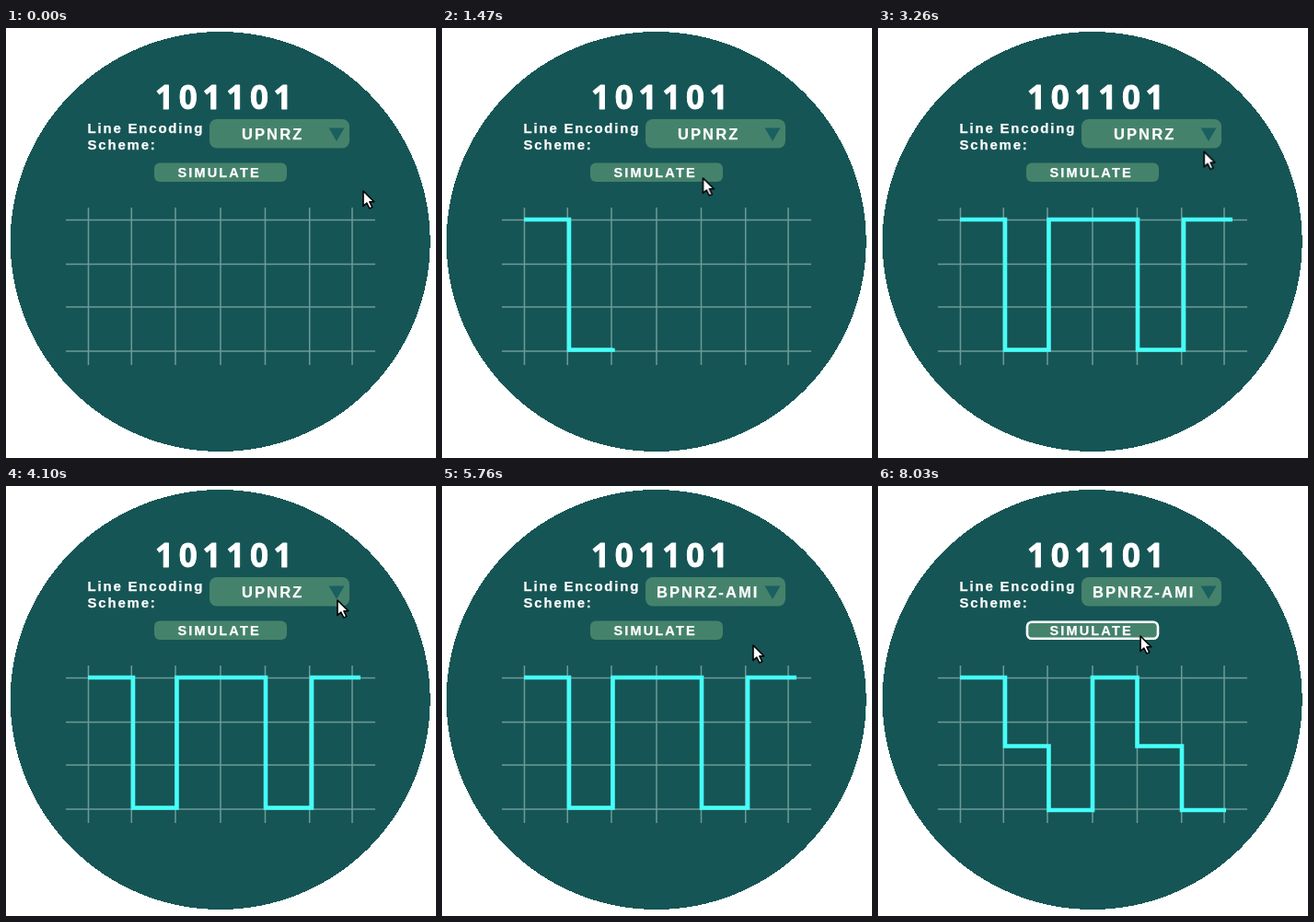
Animation of 467x467 px, one loop 8.37 s. Source, as an HTML page:

```html
<!DOCTYPE html>
<html lang="en">
<head>
<meta charset="utf-8">
<title>Line encoding simulator</title>
<style>
  html, body { margin: 0; width: 100%; height: 100%; overflow: hidden; background: #fff; }
  svg { display: block; width: 100%; height: 100%; }

  text { font: bold 15px "Liberation Sans", Arial, sans-serif; letter-spacing: 1.8px; fill: #fff; stroke: #fff; stroke-width: .25; stroke-linejoin: round; }
  .bits { font: bold 35px "Noto Sans", "Open Sans", sans-serif; letter-spacing: 5.7px; stroke-width: .9; }
  .scheme { font-size: 16.5px; letter-spacing: 2.1px; }
  .action { font-size: 14.5px; letter-spacing: 2.15px; }

  .control { fill: #45826c; }
  .grid { fill: none; stroke: #6e9b99; stroke-width: 1.5; }
  .wave { fill: none; stroke: #45fff8; stroke-width: 4.6; stroke-dasharray: 1 2; }
  .focus { fill: none; stroke: #fff; stroke-width: 2.6; }
  .pointer { fill: #fff; stroke: #000; stroke-width: 1.6; stroke-linejoin: round; }

  .timed { animation: 8370ms infinite; }
  .wave.unipolar { animation-name: drawFirst, showFirst; animation-timing-function: linear, step-end; }
  .wave.bipolar { animation-name: drawSecond, showSecond; animation-timing-function: linear, step-end; }
  .focus { animation-name: showSecond; animation-timing-function: step-end; }
  .before { animation-name: before; animation-timing-function: step-end; }
  .after { animation-name: after; animation-timing-function: step-end; }
  .pointer { animation-name: point; animation-timing-function: linear; }

  @keyframes drawFirst { 0%, 13.3% { stroke-dashoffset: 1; } 28.67%, 100% { stroke-dashoffset: 0; } }
  @keyframes drawSecond { 0%, 80.56% { stroke-dashoffset: 1; } 95.94%, 100% { stroke-dashoffset: 0; } }
  @keyframes showFirst { 0% { opacity: 0; } 14.33% { opacity: 1; } 81.6%, 100% { opacity: 0; } }
  @keyframes showSecond { 0% { opacity: 0; } 81.6%, 100% { opacity: 1; } }
  @keyframes before { 0% { opacity: 1; } 62.1%, 100% { opacity: 0; } }
  @keyframes after { 0% { opacity: 0; } 62.1%, 100% { opacity: 1; } }
  @keyframes point {
    0%, 1.55% { transform: translate(388px, 177px); animation-timing-function: ease-in-out; }
    11.11%, 27.1% { transform: translate(283.5px, 163px); animation-timing-function: ease-in; }
    30.23% { transform: translate(302px, 167px); }
    36% { transform: translate(342px, 156px); animation-timing-function: ease-out; }
    42%, 53% { transform: translate(360px, 124px); animation-timing-function: ease-in-out; }
    61%, 64% { transform: translate(351px, 167px); animation-timing-function: ease-in; }
    68.82% { transform: translate(338px, 173px); animation-timing-function: ease-out; }
    78.38%, 100% { transform: translate(285px, 163px); }
  }
</style>
</head>
<body>
<svg viewBox="0 0 467 467">
  <circle cx="232.7" cy="232" r="228" fill="#165555" shape-rendering="crispEdges"/>

  <text class="bits" x="162" y="88.3">101101</text>
  <text x="88.5" y="114">Line Encoding</text>
  <text x="88.5" y="132.3">Scheme:</text>

  <rect class="control" x="221" y="99" width="152" height="31.5" rx="8"/>
  <path d="M350.5 108.5H367.5L359 123Z" fill="#1b6060"/>
  <text class="scheme timed before" x="256" y="121">UPNRZ</text>
  <text class="scheme timed after" x="233" y="121">BPNRZ-AMI</text>

  <rect class="control" x="161" y="146.5" width="144" height="20.5" rx="6"/>
  <rect class="focus timed" x="162" y="147.7" width="142" height="18" rx="5"/>
  <text class="action" x="186.5" y="162.3">SIMULATE</text>

  <path class="grid" d="M65 208.5H401M65 256.5H401M65 303H401M65 351H401
    M89.5 195V366M136.3 195V366M184 195V366M233 195V366M281.5 195V366M329.7 195V366M376 195V366"/>

  <path class="wave unipolar timed" pathLength="1" d="M89 208H138V349.5H185.5V208H282V349.5H332V208H385"/>
  <path class="wave bipolar timed" pathLength="1" d="M89 208H138V282.5H185.5V352H233V208H281.5V282.5H330V352H378"/>

  <path class="pointer timed" d="M0 0V16.5L3.8 13L6.8 19L9.8 17.6L7 11.8H11.8Z"/>
</svg>
</body>
</html>
```
